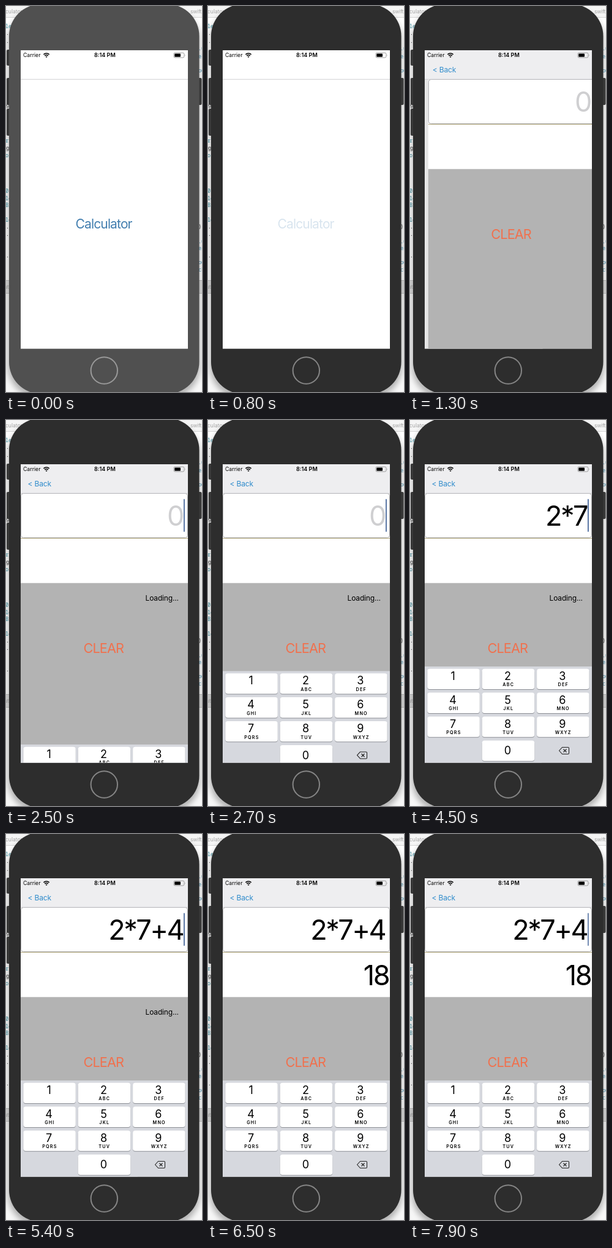
An HTML page for the animation above (8000 ms loop, 320 by 628 pixels).

```html
<!DOCTYPE html>
<html lang="en">
<head>
<meta charset="utf-8">
<title>Calculator</title>
<style>
  html, body { margin: 0; width: 100%; height: 100%; overflow: hidden; background: #f6f6f6; }
  svg { display: block; width: 320px; height: 628px; }
  text { font-family: Inter, Roboto, sans-serif; white-space: pre; }
  .code text { font: 8.5px "Noto Sans Mono", "DejaVu Sans Mono", monospace; }
  .big { font-size: 45px; letter-spacing: -2.5px; text-anchor: end; }
  .mid { text-anchor: middle; }
  .digit { font-size: 18px; }
  .abc { font-size: 7.2px; font-weight: 600; letter-spacing: 1.2px; }
  .shade { filter: blur(5px); }
</style>
</head>
<body>
<svg viewBox="0 0 320 628">
  <defs>
    <clipPath id="glass"><rect x="24" y="72" width="273" height="485.5"/></clipPath>
    <clipPath id="below"><rect x="24" y="119" width="273" height="438.5"/></clipPath>
  </defs>

  <rect width="320" height="628" fill="#fff"/>
  <rect width="320" height="18" fill="#f5f5f5"/>
  <path d="M0 18.5H320" stroke="#d4d4d4"/>
  <g class="code" id="code"></g>
  <rect y="446" width="320" height="22" fill="#dedede"/>
  <path d="M0 446.5H320M0 467.5H320" stroke="#c2c2c2"/>
  <rect y="468" width="320" height="160" fill="#f7f7f7"/>
  <g font-size="8.5" fill="#a4a4a4">
    <text x="-1" y="12">culator</text>
    <text x="301" y="12" letter-spacing="-.2">swift</text>
    <text x="-3" y="460">ut</text>
  </g>

  <rect class="shade" x="3" y="4" width="314" height="634" rx="52" fill="#000" opacity=".28"/>
  <path d="M1 73q0-2 2-2h4v26H3q-2 0-2-2zM1 119q0-2 2-2h4v44H3q-2 0-2-2zM1 169q0-2 2-2h4v44H3q-2 0-2-2zM319.500 119q0-2-2-2h-4v44h4q2 0 2-2z" fill="#383838"/>
  <rect id="body" x="5" y="-3" width="310.500" height="634" rx="52"/>
  <circle id="home" cx="160.300" cy="593" r="21.700" fill="none" stroke-width="2"/>

  <g clip-path="url(#glass)">
    <rect x="24" y="72" width="273" height="486" fill="#fff"/>

    <g clip-path="url(#below)">
      <g id="menu">
        <rect x="24" y="119" width="273" height="439" fill="#fff"/>
        <text id="link" class="mid" x="159.600" y="362" font-size="21" letter-spacing="-.85" fill="#427eaf">Calculator</text>
      </g>
      <rect id="dim" x="24" y="119" width="273" height="439"/>

      <g id="calc">
        <rect x="24" y="119" width="273" height="147" fill="#fff"/>
        <rect x="24" y="265.300" width="273" height="293" fill="#b3b3b3"/>
        <path d="M24 192.500H297" stroke="#b9ae82"/>
        <rect x="24.500" y="119.500" width="272" height="72" rx="4" fill="#fff" stroke="#a9a9ab"/>
        <text id="entry" class="big" x="289" y="171.500"></text>
        <rect id="caret" x="290" y="128.500" width="1.800" height="53.500" rx=".9" fill="#49699c"/>
        <text id="result" class="big" x="295" y="245.500"></text>
        <text id="loading" x="227.500" y="293.700" font-size="12" letter-spacing="-.15">Loading...</text>
        <text class="mid" x="159.300" y="379" font-size="21.700" letter-spacing="-.9" fill="#f0714e">CLEAR</text>
      </g>
    </g>

    <g id="pad"><rect x="24" y="401" width="273" height="158" fill="#d6d8de"/></g>

    <rect id="bar" x="24" y="72" width="273" height="47" fill="#eeeef0"/>
    <path d="M24 119.300H297" stroke="#c6c6c8" stroke-width=".8"/>
    <text id="back" x="35.500" y="108" font-size="12" letter-spacing="-.15" fill="#2e8bcb">&lt; Back</text>

    <text x="28" y="83.200" font-size="8.700">Carrier</text>
    <g fill="none" stroke="#000" stroke-width="1.500">
      <path d="M61.400 78.900a6.500 6.500 0 0 1 9.200 0M63.200 81a4 4 0 0 1 5.600 0"/>
      <path d="M66 84l-1.500-1.600a2.200 2.200 0 0 1 3 0z" fill="#000" stroke="none"/>
    </g>
    <text class="mid" x="161.300" y="83.300" font-size="9" font-weight="600">8:14 PM</text>
    <rect x="273.900" y="76.200" width="17" height="7.800" rx="2" fill="none" stroke="#8a8a8a" stroke-width=".8"/>
    <rect x="275.200" y="77.500" width="9.800" height="5.200" rx=".9"/>
    <path d="M291.900 78.700q1.300 1.400 0 2.800z" fill="#8a8a8a"/>
  </g>
</svg>

<script>
const LOOP = 8000, STEP = 100, WIDTH = 273, PAD = 157;
const $ = id => document.getElementById(id);

function add(parent, tag, attrs, label = '') {
  const node = document.createElementNS('http://www.w3.org/2000/svg', tag);
  for (const k in attrs) node.setAttribute(k, attrs[k]);
  node.textContent = label;
  return parent.appendChild(node);
}

// Slivers of the editor that show on either side of the phone.
const TEAL = '#3d8e9f', INK = '#333', BLUE = '#4795b5';
function lines(x, fill, rows) {
  for (const y in rows) add($('code'), 'text', { x, y, fill }, rows[y]);
}
lines(-1, TEAL, { 36: 'le', 222: 'ri', 246: 'os', 304: '0', 316: 'le', 327: 'Bi', 351: 'le' });
lines(-5, INK, { 47: 'r.', 60: 'r.', 164: 'ng', 211: 'm', 234: 'ng', 362: 'r.', 374: 'r.', 409: 'r.' });
lines(314, BLUE, { 72: '.u', 85: 'el', 108: 'ou', 386: '.u', 397: 'el', 420: 'ou', 432: 'ck' });
lines(314, INK, { 362: ')' });

// Number pad
const pad = $('pad');
function key(label, abc, col, row) {
  const x = 28.3 + col * 89.4, y = 404.7 + row * 38.9, mid = x + 42.5;
  const box = { x, width: 85.5, height: 33.3, rx: 4 };
  add(pad, 'rect', { ...box, y: y + 1, fill: '#8d9096' });
  add(pad, 'rect', { ...box, y, fill: '#fff' });
  add(pad, 'text', { class: 'mid digit', x: mid - .7, y: y + (row < 3 ? 18.3 : 23) }, label);
  add(pad, 'text', { class: 'mid abc', x: mid + .6, y: y + 28.7 }, abc);
}
['', 'ABC', 'DEF', 'GHI', 'JKL', 'MNO', 'PQRS', 'TUV', 'WXYZ']
  .forEach((abc, i) => key(i + 1, abc, i % 3, Math.floor(i / 3)));
key(0, '', 1, 3);
add(pad, 'path', {
  d: 'M243.500 538l5-5.500h9.500q1.500 0 1.500 1.500v8q0 1.500-1.500 1.500h-9.500zM250.500 535.500l5 5m0-5l-5 5',
  fill: 'none', stroke: '#222', 'stroke-width': 1.1, 'stroke-linejoin': 'round'
});

// Each row holds from its time until the next one.
const ENTRY = [[0, ''], [3000, '2'], [3900, '2*'], [4400, '2*7'], [5100, '2*7+'], [5300, '2*7+4']];
const RESULT = [[0, ''], [3400, '2'], [3900, ''], [4900, '14'], [5100, ''], [5900, '18']];
const LOADING = [[0, 0], [2500, 1], [3400, 0], [3900, 1], [4900, 0], [5100, 1], [5900, 0]];
// Caret opacity, linear between rows.
const CARET = [[2400, 0], [2500, 1], [5600, 1], [5800, 0], [5900, 0], [6100, 1], [6300, 1],
  [6500, 0], [6700, 0], [6900, 1], [7300, 1], [7500, 0], [7600, 0], [7900, .85], [8000, 1]];

const held = (rows, t) => rows.filter(r => r[0] <= t).pop()[1];

function ramp(rows, t) {
  const i = rows.findIndex(r => r[0] > t);
  if (i < 1) return i ? rows[rows.length - 1][1] : rows[0][1];
  const [t0, a] = rows[i - 1], [t1, b] = rows[i];
  return a + (b - a) * (t - t0) / (t1 - t0);
}

// Critically damped spring: remaining distance, 1 down to 0.
function rest(t, start, rate) {
  const u = Math.max(0, t - start) / 1000 * rate;
  const left = (1 + u) * Math.exp(-u);
  return left < .001 ? 0 : left;
}

const shift = (id, x, y) => $(id).setAttribute('transform', `translate(${x.toFixed(2)} ${y.toFixed(2)})`);
const fade = (id, v) => $(id).setAttribute('opacity', v);

function draw(t) {
  const active = t >= 600;
  $('body').setAttribute('fill', active ? '#2d2d2d' : '#505050');
  $('home').setAttribute('stroke', active ? '#858585' : '#999');
  fade('link', ramp([[600, 1], [700, .2], [1000, .2], [1300, 1]], t));

  const push = rest(t, 980, 18), shown = 1 - push;
  shift('menu', -.3 * WIDTH * shown, 0);
  shift('calc', WIDTH * push, 0);
  shift('back', 60 * push, 0);
  fade('dim', .1 * shown);
  fade('bar', shown);
  fade('back', shown);

  shift('pad', 0, PAD * rest(t, 2460, 20));

  const entry = held(ENTRY, t);
  $('entry').textContent = entry || '0';
  $('entry').setAttribute('fill', entry ? '#000' : '#cfcfd1');
  $('result').textContent = held(RESULT, t);
  fade('loading', held(LOADING, t));
  fade('caret', ramp(CARET, t));
}

function tick() {
  const t = performance.now() % LOOP;
  draw(Math.floor(t / STEP) * STEP);
  requestAnimationFrame(tick);
}
tick();
</script>
</body>
</html>
```
